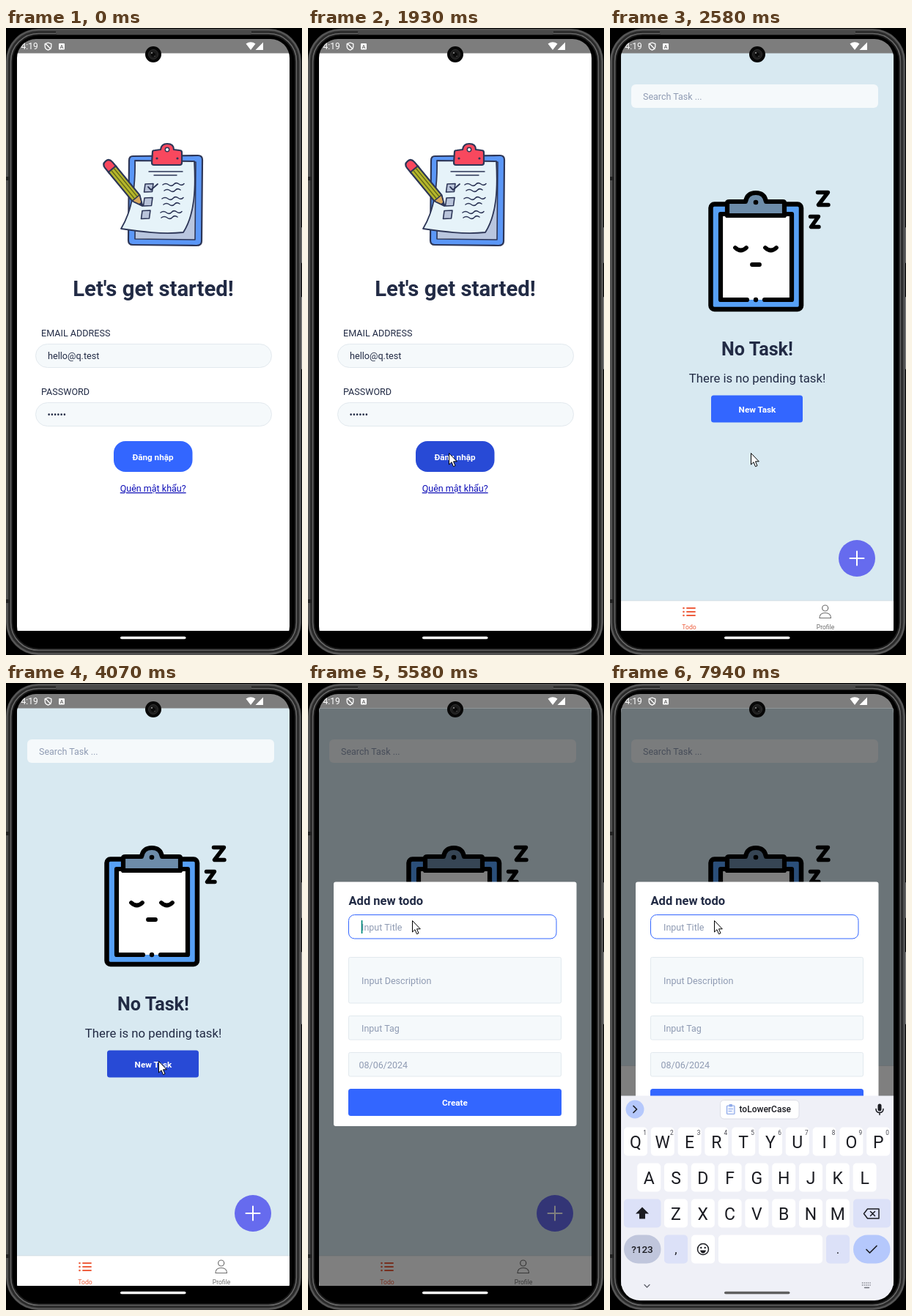
Animation, 404 px wide and 856 px high, one loop 8000 ms. Source, as an HTML page:

```html
<!DOCTYPE html>
<html lang="vi">
<head>
<meta charset="utf-8">
<title>Todo app</title>
<style>
  html, body { margin: 0; width: 100%; height: 100%; overflow: hidden; background: #000; }
  svg { display: block; width: 100%; height: 100%; }
  text { font-family: Roboto, sans-serif; white-space: pre; }
</style>
</head>
<body>
<svg id="stage" viewBox="0 0 404 856" xmlns="http://www.w3.org/2000/svg"></svg>
<script>
const LOOP = 8000;
const INK = '#222b45', BLUE = '#3366ff', PRESSED = '#284ad6', HINT = '#8f9bb3', FIELD = '#f5f9fb';

const rect = (x, y, x2, y2, r, fill, more = '') =>
  `<rect x="${x}" y="${y}" width="${x2 - x}" height="${y2 - y}" rx="${r}" fill="${fill}" ${more}/>`;
const circle = (x, y, r, fill, more = '') =>
  `<circle cx="${x}" cy="${y}" r="${r}" fill="${fill}" ${more}/>`;
const path = (d, fill, more = '') => `<path d="${d}" fill="${fill}" ${more}/>`;
const line = (d, color, width, more = '') =>
  path(d, 'none', `stroke="${color}" stroke-width="${width}" stroke-linecap="round" stroke-linejoin="round" ${more}`);
const text = (s, x, y, size, fill, more = '') =>
  `<text x="${x}" y="${y}" font-size="${size}" fill="${fill}" ${more}>${s}</text>`;
const MID = 'text-anchor="middle"', BOLD = 'font-weight="700"', MIDBOLD = MID + ' ' + BOLD;
const field = (x, y, x2, y2, r, more = '') =>
  rect(x + .5, y + .5, x2 - .5, y2 - .5, r, FIELD, `stroke="#e2e9ee" ${more}`);
const group = (id, body, more = '') => `<g id="${id}" ${more}>${body}</g>`;

function phone() {
  return rect(401, 272, 404, 321, 1, '#6f6f6f') + rect(401, 367, 404, 466, 1, '#858585') +
    rect(0, 1, 403, 856, 44, '#2c2c2c') +
    rect(1.5, 2.5, 401.5, 854.5, 43, 'none', 'stroke="#575757" stroke-width="2.5"') +
    rect(5, 6, 398, 851, 40, '#1b1b1b') +
    rect(6.5, 7.5, 396.5, 849.5, 38, 'none', 'stroke="#6a6a6a" stroke-width="1.5"') +
    rect(9, 10, 394, 847, 36, '#000') +
    rect(68, 3, 335, 9, 2, '#4a4a4a') +
    [203, 780].map(y => rect(0, y, 5, y + 5, 0, '#222')).join('');
}

function statusBar() {
  return rect(15, 15, 387, 34.5, 0, '#7d7d7d') +
    text('4:19', 20.5, 29, 12, '#fff') +
    line('M57.5 20l4.3 1.6v3.4c0 2.600-1.700 4.300-4.300 5.200c-2.600-.9-4.300-2.600-4.300-5.200v-3.400zM54 21.500l7 7', '#fff', 1.3) +
    rect(72, 21, 80, 29.500, 1, '#fff') + text('A', 76, 28, 7.500, '#7d7d7d', MIDBOLD) +
    path('M327.500 21.500Q334 17 340.500 21.500L334 30zM351 19.500V30H340.500z', '#fff');
}

function camera() {
  return circle(201, 36, 11, '#070707') + circle(201, 36, 6.5, '#1d1d1d', 'stroke="#303030"') +
    circle(201, 36.500, 3, '#0a0a0a') + circle(199, 34, 1.1, '#8a8a8a') + circle(203, 38.5, .8, '#555');
}

function checklist() {
  const c = '#2d3657', o = `stroke="${c}" stroke-width="2.2" stroke-linejoin="round"`;
  const wave = (x, y, n) => `M${x} ${y}q4-3 8 0` + 't7-.5'.repeat(n);
  const box = (x, y) => path(`M${x} ${y}l11-.5l-1.500 11l-11 .5z`, '#b9c4da', o.replace('2.2', '1.600'));
  return path('M173 175L262 174Q268 174 268 180L267 291Q267 297 260 297L173 296Q167 296 167 290L168 181Q168 175 173 175z', '#5b97f7', o) +
    path('M177 183H259L258 289L176 288z', '#b9c6df', o.replace('2.2', '1.6')) +
    path('M176 181L257 182C259 218 258 254 242 279C213 282 184 278 157 274C170 253 177 225 176 181z', '#e6f3f9', o.replace('2.2', '1.800')) +
    path('M200 169Q200 167 203 167L211 166Q212 158 220 158Q229 158 229 166L237 167Q240 167 240 170V184Q240 187 237 187H202Q199 187 199 184z', '#f8485e', o) +
    circle(220, 166, 2.7, '#fff', o.replace('2.2', '1.5')) + circle(206, 178, 1.6, c) + circle(234, 178, 1.6, c) +
    line('M195 196H241M202 201H233', c, 1.4) +
    box(190, 213) + box(189, 232) + box(186, 249.5) + line('M194 217l4 4l9-8', c, 1.8) +
    line([[214, 214, 3], [216, 222, 2], [213, 233, 3], [215, 241, 2], [211, 252, 3], [212, 259, 2]]
      .map(w => wave(...w)).join(''), c, 1.500) +
    `<g transform="translate(141 188) rotate(-39.500)">` +
    path('M-6.500 8V-1Q-6.500 -8 0 -8T6.500 -1V8z', '#f8485e', o) +
    path('M-6.500 6H6.500V57L0 71L-6.500 57z', '#b5b62c', o) +
    path('M-6.500 57H6.500L0 71z', '#d8a85c', o.replace('2.2', '1.5')) +
    line('M-2 7V56M2.500 7V56', '#626719', 1.4) + path('M-2.500 66L0 71L2.500 66z', c) + '</g>';
}

function login() {
  return rect(15, 34, 387, 823, 0, '#fff') + checklist() +
    text("Let's get started!", 201, 366, 29.3, INK, MIDBOLD) +
    text('EMAIL ADDRESS', 48, 420.500, 12.6, INK) + field(40, 431, 363, 464, 16) +
    text('hello@q.test', 57, 452, 12.67, INK) +
    text('PASSWORD', 48, 500.5, 12.6, INK) + field(40, 511, 363, 544, 16) +
    text('••••••', 56.5, 532, 12.67, INK) +
    rect(147, 564, 254.500, 606, 16, BLUE, 'id="loginBtn"') +
    text('Đăng nhập', 200.5, 590, 11.7, '#fff', MIDBOLD) +
    text('Quên mật khẩu?', 200.7, 633, 12.5, '#1010b8', MID + ' text-decoration="underline"');
}

function sleeper() {
  const b = '#000';
  return rect(137.5, 240.5, 261, 384, 5, '#57a0f5', 'stroke="#000" stroke-width="6.5"') +
    rect(151, 254, 248, 371, 0, '#fff') +
    line('M187 371H151V254H248V371H211', b, 6.2) + circle(199, 371, 3.2, b) +
    path('M163 237H185Q187 225 199 225T213 237H236Q238 237 238 239V256H160V239Q160 237 163 237z', '#6d8ca9', 'stroke="#000" stroke-width="6.2" stroke-linejoin="round"') +
    circle(199, 238, 3.3, b) +
    line('M171 300q7.500 7 15 0M212 300q7.500 7 15 0M194 323h10', b, 5.8) +
    line('M283.500 224.500h14l-13 17h13.500M273.500 257.500h11l-10 14h10.500', b, 5.4);
}

function home() {
  const tabs = rect(15, 782, 387, 823, 0, '#fff') + rect(15, 781.500, 387, 782.300, 0, '#d3dce2') +
    [792, 797, 802].map(y => circle(100.500, y, 1.300, '#ee5f3f') + line(`M105 ${y}H116`, '#ee5f3f', 1.8)).join('') +
    text('Todo', 108, 820.500, 8.7, '#ee5f3f', MID) +
    circle(293.700, 792, 4, 'none', 'stroke="#707070" stroke-width="1.200"') +
    path('M286 805.500Q286 798.500 293.700 798.500T301.500 805.500z', 'none', 'stroke="#707070" stroke-width="1.200" stroke-linejoin="round"') +
    text('Profile', 294, 820.500, 8.6, '#707070', MID) +
    circle(337, 724, 25, '#666bee') + line('M327.500 724H346.500M337 714.500V733.500', '#fff', 2);
  return rect(15, 34, 387, 823, 0, '#d8e9f1') +
    rect(29, 77, 366, 109, 6, FIELD) + text('Search Task ...', 45, 97.5, 12.5, HINT) + sleeper() +
    text('No Task!', 201, 447, 25.2, INK, MIDBOLD) +
    text('There is no pending task!', 201, 484, 16.75, INK, MID) +
    rect(138, 501.500, 263, 538.500, 3.5, BLUE, 'id="newBtn"') +
    text('New Task', 201, 524.5, 11.75, '#fff', MIDBOLD) + group('tabs', tabs);
}

function modal() {
  return rect(35, 271.500, 366.500, 605, 3, '#fff') +
    text('Add new todo', 55.500, 303, 16.5, INK, BOLD) +
    field(55, 316, 339.500, 349.500, 8, 'id="titleField"') + text('Input Title', 73, 337.500, 12.5, HINT) +
    rect(72.700, 324, 74.400, 342, 0, '#00897b', 'id="caret"') +
    field(55, 374, 346, 437.500, 2) + text('Input Description', 73, 410.500, 12.6, HINT) +
    field(55, 454, 346, 487.500, 2) + text('Input Tag', 73, 475.5, 12.5, HINT) +
    field(55, 504, 346, 537.500, 2) + text('08/06/2024', 69.500, 525.500, 12.5, HINT) +
    rect(55, 554, 346, 591, 3.5, BLUE) + text('Create', 200.500, 577, 11.75, '#fff', MIDBOLD);
}

function keyboard() {
  const dark = '#1b1c22', tint = '#dce1f8', pitch = 36.8;
  const key = (x, x2, y, fill = '#fff', r = 5) => rect(x, y, x2, y + 39, r, fill);
  const row = (letters, x, y) => [...letters].map((ch, i) => {
    const c = x + i * pitch;
    return key(c - 16, c + 16, y) + text(ch, c, y + 28, 23, dark, MID) +
      (y < 610 ? text((i + 1) % 10, c + 12.500, y + 10, 8.3, '#45464f', MID) : '');
  }).join('');
  return rect(15, 563.500, 387, 844, 0, '#eff0f7') +
    circle(34, 582, 12.500, '#b5c8fc') + line('M32 577.500l4.500 4.500l-4.500 4.500', dark, 1.7) +
    rect(150.500, 569.500, 258, 595, 5, '#fff', 'stroke="#dcdee6"') +
    rect(159.500, 577, 170, 588.500, 1, '#edf2ff', 'stroke="#8ea9e8" stroke-width="1.200"') +
    rect(162.500, 575, 167, 578.500, 1, '#8ea9e8') + line('M162 581.500h5.500M162 584.500h4', '#8ea9e8', 1) +
    text('toLowerCase', 176.500, 586.200, 12, dark, 'font-weight="500"') +
    rect(365.500, 574.500, 370.500, 584.500, 2.5, dark) +
    line('M363 581.500q0 5 5 5t5-5M368 586.500v3', dark, 1.500) +
    row('QWERTYUIOP', 35, 606.500) + row('ASDFGHJKL', 53.200, 655.500) + row('ZXCVBNM', 90, 704.500) +
    key(19, 69.500, 704.500, tint) + path('M44 715.500l9 9h-5v7h-8v-7h-5z', dark) +
    key(332, 383, 704.500, tint) +
    line('M351.500 718H367V731H351.500L346.500 724.500zM355.500 721.500l6 6M361.500 721.500l-6 6', dark, 1.500) +
    key(19, 69.500, 753.500, '#c0c6dc', 19.5) + text('?123', 44, 777.500, 13.500, dark, MID + ' font-weight="500"') +
    key(74, 106, 753.500, tint) + text(',', 90, 778.500, 17, dark, MID) +
    key(111, 143, 753.500) + circle(127, 773, 7.500, 'none', `stroke="${dark}" stroke-width="1.500"`) +
    circle(124.300, 771, 1.2, dark) + circle(129.700, 771, 1.2, dark) + path('M123 774.500h8q-1 4-4 4t-4-4z', dark) +
    key(148, 290, 753.500) + key(295, 327, 753.500, tint) + text('.', 311, 778.500, 17, dark, MID) +
    key(332, 382.500, 753.500, '#b5c8fc', 19.5) + line('M350 773.500l4.500 4.500l9.500-9.500', dark, 1.700) +
    line('M47 821.500l3.500 3.500l3.500-3.500', '#5b5d66', 1.200) +
    [819, 822].map(y => line(`M344.500 ${y}H357`, '#6d6f78', 1.5, 'stroke-dasharray=".1 2.500"')).join('') +
    line('M347.500 825.500h6', '#6d6f78', 1.400);
}

const svg = document.getElementById('stage');
svg.innerHTML = '<defs><clipPath id="screen">' + rect(15, 15, 387, 843, 26, '#fff') + '</clipPath></defs>' +
  rect(0, 0, 404, 856, 0, '#000') + phone() +
  group('view', login() + group('home', home()) +
    rect(15, 34.500, 387, 823, 0, '#000', 'id="shade" opacity=".5"') + group('modal', modal()) +
    group('keys', keyboard()) + statusBar() + rect(156, 830.700, 245.500, 834.300, 1.8, '#fff', 'id="pill"'),
    'clip-path="url(#screen)"') +
  camera() +
  group('cursor', path('M.5.5V16L4 12.700L6.500 18.700L9 17.600L6.500 11.800H11.300z', '#fff', 'stroke="#000" stroke-linejoin="round"'));

const el = {};
svg.querySelectorAll('[id]').forEach(e => el[e.id] = e);
const set = (id, name, value) => el[id].setAttribute(name, value);
const show = (id, on) => set(id, 'visibility', on ? 'visible' : 'hidden');

// Progress 0..1 in n equal jumps, the first at a and the last at b.
function steps(t, a, b, n) {
  if (t < a) return 0;
  if (t >= b) return 1;
  return Math.min(n, Math.floor((t - a) / (b - a) * (n - 1)) + 1) / n;
}
const passed = (t, times) => times.filter(x => t >= x).length;

function along(points, p) {
  const s = p * (points.length - 1), i = Math.min(Math.floor(s), points.length - 2), f = s - i;
  return points[i].map((v, k) => v + (points[i + 1][k] - v) * f);
}

const MOVES = [
  [1070, 1300, 4, [[-8, 418], [156, 547]]],
  [1460, 1780, 5, [[156, 547], [192, 580]]],
  [2910, 3670, 11, [[192, 580], [204, 542], [213, 511], [207, 516]]],
  [3740, 3740, 1, [[207, 516], [208, 516]]],
  [4710, 5340, 9, [[208, 516], [188, 378], [165, 240], [142, 324]]]
];
const PILL = [5960, 6120, 6280, 6650, 6900, 7140, 7440];
const BLINK = [5510, 5960, 6420, 6900, 7440, 7940];

function draw(t) {
  const move = MOVES.filter(m => t >= m[0]).pop();
  show('cursor', move);
  if (move) {
    const [a, b, n, points] = move;
    set('cursor', 'transform', `translate(${along(points, steps(t, a, b, n))})`);
  }

  set('loginBtn', 'fill', t >= 1930 && t < 2580 ? PRESSED : BLUE);
  set('home', 'opacity', steps(t, 2270, 2580, 5));
  set('newBtn', 'fill', t >= 4070 && t < 4470 ? PRESSED : BLUE);

  show('shade', t >= 4400);
  set('modal', 'opacity', t < 4470 ? 0 : t < 4540 ? .5 : 1);
  set('titleField', 'stroke', t >= 5510 ? BLUE : '#e2e9ee');
  set('titleField', 'fill', t >= 5510 ? '#fff' : FIELD);
  show('caret', passed(t, BLINK) % 2);

  const k = steps(t, 5650, 5800, 3);
  show('keys', k > 0);
  set('keys', 'transform', `translate(0 ${280 * (1 - k) ** 2})`);
  set('tabs', 'transform', `translate(0 ${k === 1 ? -259.500 : 0})`);

  const g = Math.round(255 - 160 * passed(t, PILL) / PILL.length);
  set('pill', 'fill', `rgb(${g},${g},${g})`);
}

function tick() {
  draw(performance.now() % LOOP);
  requestAnimationFrame(tick);
}
tick();
</script>
</body>
</html>
```
